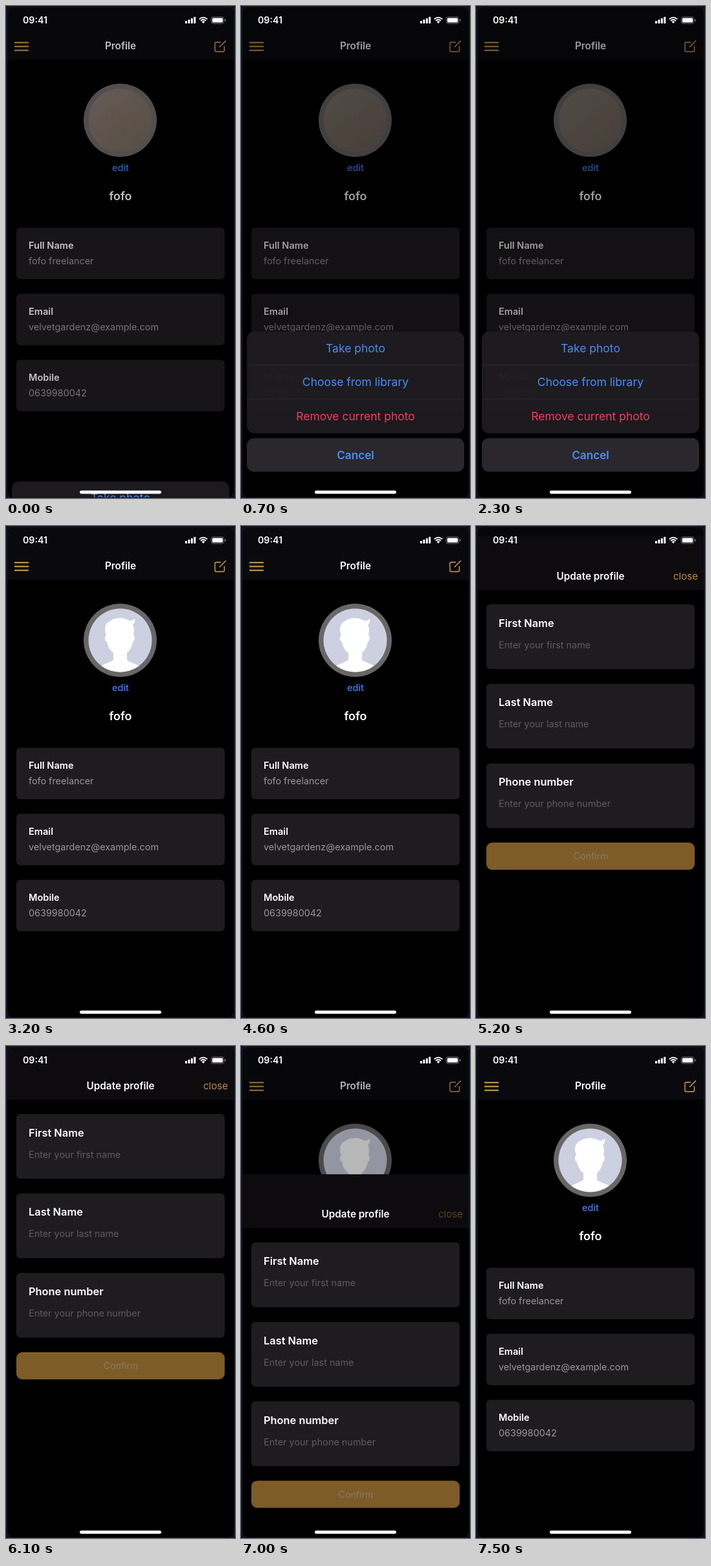
Write an HTML page that moves like this. It is 354 px wide and 760 px high and loops after 7.6 s.

```html
<!DOCTYPE html>
<html lang="en">
<head>
<meta charset="utf-8">
<title>Profile screen</title>
<style>
  html, body { margin: 0; width: 100%; height: 100%; overflow: hidden; background: #0a1128; }
  svg { display: block; width: 354px; height: 760px; }
  text { font-family: Inter, Roboto, "Liberation Sans", sans-serif; font-size: 14.4px; fill: #fff; }
  .mid { text-anchor: middle; }
  .title { font-size: 15.3px; font-weight: 600; }
  .label { font-size: 14.6px; font-weight: 600; }
  .value { fill: #99979b; }
  .field { font-size: 16.4px; font-weight: 600; }
  .hint { fill: #5d5b5f; }
  .name { font-size: 18px; font-weight: 600; }
  .edit { font-weight: 500; fill: #4080f8; }
  .row { font-size: 17.5px; fill: #4b8cfb; }
  .red { fill: #ee3f5e; }
  .cancel { font-size: 17.2px; font-weight: 600; fill: #4b8cfb; }
  .close { font-size: 15.1px; fill: #bd8d3c; text-anchor: end; }
  .confirm { font-size: 14.2px; fill: #8a7a66; }
  .clock { font-size: 14.2px; font-weight: 600; }
  .gold { fill: none; stroke: #d6a24b; stroke-width: 1.9; }
  .thin { stroke-width: 1.4; stroke-linejoin: round; }
</style>
</head>
<body>
<svg viewBox="0 0 354 760">
  <defs>
    <clipPath id="phone"><rect x="2" y="1.5" width="350.5" height="758" rx="9"/></clipPath>
    <clipPath id="round"><circle cx="176.5" cy="176.5" r="49"/></clipPath>
    <linearGradient id="photoTone" x1="0.2" y1="0.1" x2="0.8" y2="0.9">
      <stop offset="0" stop-color="#82766d"/>
      <stop offset="0.5" stop-color="#7b6e64"/>
      <stop offset="1" stop-color="#75695f"/>
    </linearGradient>
  </defs>

  <g clip-path="url(#phone)">
    <rect width="354" height="760"/>

    <g id="profile">
      <rect width="354" height="83" fill="#0a090d"/>
      <text class="title mid" x="177" y="67">Profile</text>
      <path class="gold" d="M13 56.500H35M13 62.500H35M13 68.500H35"/>
      <path class="gold thin" d="M332 56H325Q323 56 323 58V68.500Q323 70.500 325 70.500H335.500Q337.500 70.500 337.500 68.500V62M330 63.500L340 53.500"/>
      <circle cx="176.500" cy="176.500" r="56.500" fill="#696667"/>
      <g id="blank" clip-path="url(#round)">
        <rect x="127" y="127" width="99" height="99" fill="#cdd0e0"/>
        <path fill="#fff" d="M138 226C142 214 160 212 166 207V196C159 191 157 184 156 179C152 178 152 170 155 169
          C151 158 153 150 161 147C166 142 180 141 186 144C191 147 196 147 199 143C200 148 198 151 196 153
          C199 158 198 164 197 169C200 170 199 178 196 179C195 185 192 192 187 196V207C193 212 211 214 215 226Z"/>
      </g>
      <circle id="photo" cx="176.500" cy="176.500" r="49" fill="url(#photoTone)"/>
      <text class="edit mid" x="177" y="255">edit</text>
      <text class="name mid" x="177" y="300">fofo</text>
      <g id="details"></g>
    </g>

    <rect id="dim" width="354" height="760"/>

    <g id="sheet">
      <rect x="9" y="503" width="336" height="157" rx="11" fill="#1d1b1f" fill-opacity="0.97"/>
      <path d="M9 554.500H345M9 607H345" stroke="#2d2c2f" stroke-width="0.8"/>
      <text class="row mid" x="177" y="535">Take photo</text>
      <text class="row mid" x="177" y="587">Choose from library</text>
      <text class="row red mid" x="177" y="640">Remove current photo</text>
      <rect x="9" y="667.500" width="336" height="52" rx="11" fill="#2a282c"/>
      <text class="cancel mid" x="177" y="700">Cancel</text>
    </g>

    <g id="modal">
      <rect width="354" height="760"/>
      <rect width="354" height="83" fill="#0d0b0e"/>
      <text class="title mid" x="177" y="67">Update profile</text>
      <text class="close" id="close" x="343" y="67">close</text>
      <g id="form"></g>
      <rect x="16" y="473" width="322" height="42" rx="9" fill="#7d5c27"/>
      <text class="confirm mid" x="177.500" y="499.300">Confirm</text>
    </g>

    <text class="clock" x="26" y="27">09:41</text>
    <g fill="#fff">
      <rect x="277" y="23" width="3" height="4" rx="0.8"/>
      <rect x="281.400" y="21" width="3" height="6" rx="0.8"/>
      <rect x="285.800" y="19" width="3" height="8" rx="0.8"/>
      <rect x="290.200" y="16.700" width="3" height="10.300" rx="0.8"/>
      <path d="M305 27L302.500 24.300Q305 22.200 307.500 24.300Z"/>
      <rect x="318.800" y="18.500" width="16.400" height="7" rx="1.600"/>
      <rect x="338.300" y="20.300" width="1.400" height="3.400" rx="0.7" opacity="0.5"/>
    </g>
    <path d="M298.700 20.400Q305 14.800 311.300 20.400M300.900 22.800Q305 19.200 309.100 22.800" fill="none" stroke="#fff" stroke-width="1.700"/>
    <rect x="317.200" y="16.900" width="19.600" height="10.200" rx="2.800" fill="none" stroke="#77767a" stroke-width="0.9"/>
    <rect x="114" y="748.500" width="126" height="5" rx="2.500" fill="#fff"/>
  </g>
  <rect x="2" y="1.500" width="350.500" height="758" rx="9" fill="none" stroke="#191b26" stroke-width="0.8"/>
</svg>

<script>
const LOOP = 7600, STEP = 100, HEIGHT = 760;
const $ = id => document.getElementById(id);
const clamp = v => Math.max(0, Math.min(1, v));
const smooth = v => { v = clamp(v); return v * v * (3 - 2 * v); };
const show = (el, on) => { el.style.visibility = on ? "visible" : "hidden"; };

// Critically damped spring from 0 to 1, time in ms.
function spring(ms) {
  if (ms <= 0) return 0;
  const x = Math.sqrt(1000 / 3) * ms / 1000;
  return 1 - Math.exp(-x) * (1 + x);
}

function card(y, height, head, headY, headClass, body, bodyY, bodyClass) {
  return `<rect x="16" y="${y}" width="322" height="${height}" rx="6" fill="#1e1c1f"/>
    <text class="${headClass}" x="35" y="${y + headY}">${head}</text>
    <text class="${bodyClass}" x="35" y="${y + bodyY}">${body}</text>`;
}

$("details").innerHTML = [
  ["Full Name", "fofo freelancer"],
  ["Email", "velvetgardenz@example.com"],
  ["Mobile", "0639980042"]
].map(([a, b], i) => card(342.5 + 102 * i, 79.5, a, 32.5, "label", b, 56, "value")).join("");

$("form").innerHTML = [
  ["First Name", "first name"],
  ["Last Name", "last name"],
  ["Phone number", "phone number"]
].map(([a, b], i) => card(105 + 122.8 * i, 100, a, 34.5, "field", "Enter your " + b, 67.5, "hint")).join("");

function place(el, y) {
  el.setAttribute("transform", `translate(0 ${y.toFixed(2)})`);
  show(el, y < HEIGHT);
}

function draw(t) {
  const sheetOut = spring(t - 2500);
  place($("sheet"), t < 3200 ? 257 * (1 - spring(t + 29) + sheetOut) : HEIGHT);

  const open = spring(t - 4884) - spring(t - 6945.7);
  place($("modal"), t < 4884 || t >= 7500 ? HEIGHT : HEIGHT * (1 - open));

  const sheetDim = 0.38 * clamp(0.63 + 0.37 * t / 200) * (1 - smooth((t - 2500) / 350));
  $("dim").setAttribute("opacity", Math.max(sheetDim, 0.38 * open));
  show($("photo"), t < 2800);
  show($("blank"), t >= 2800);

  const press = smooth((t - 6650) / 150) - smooth((t - 6930) / 250);
  $("close").setAttribute("opacity", 1 - 0.72 * press);
}

const start = performance.now();
function tick(now) {
  const t = Math.max(0, now - start) % LOOP;
  draw(Math.floor((t + 10) / STEP) * STEP % LOOP);
  requestAnimationFrame(tick);
}
draw(0);
requestAnimationFrame(tick);
</script>
</body>
</html>
```
